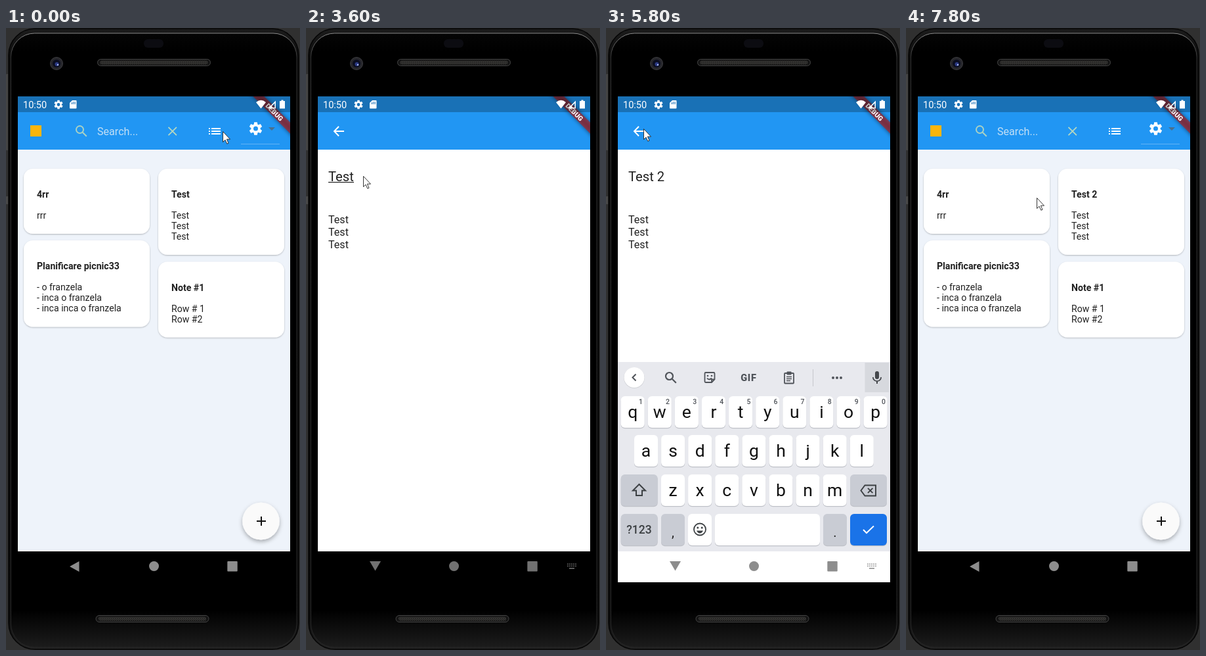
An HTML page that plays this animation: 448x946 px, repeating every 8000 ms.

```html
<!DOCTYPE html>
<html lang="en">
<head>
<meta charset="utf-8">
<title>Notes app</title>
<style>
  html, body { margin: 0; width: 100%; height: 100%; overflow: hidden; background: #303030; }
  svg { display: block; width: 100vw; height: 100vh; }
  text { font-family: Roboto, sans-serif; white-space: pre; }
</style>
</head>
<body>
<svg id="stage" viewBox="0 0 448 946"></svg>
<script>
const LOOP = 8000, STEP = 200;
const stage = document.getElementById('stage');

// ---- markup helpers ----
const rect = (x, y, w, h, fill, r = 0, extra = '') =>
  `<rect x="${x}" y="${y}" width="${w}" height="${h}" rx="${r}" fill="${fill}" ${extra}/>`;
const circle = (x, y, r, fill, extra = '') =>
  `<circle cx="${x}" cy="${y}" r="${r}" fill="${fill}" ${extra}/>`;
const text = (x, y, size, str, fill = '#212121', extra = '') =>
  `<text x="${x}" y="${y}" font-size="${size}" fill="${fill}" ${extra}>${str}</text>`;
const path = (d, fill, extra = '') => `<path d="${d}" fill="${fill}" ${extra}/>`;
const line = (d, color, width, extra = '') =>
  path(d, 'none', `stroke="${color}" stroke-width="${width}" ${extra}`);
const group = (id, content, extra = '') => `<g id="${id}" ${extra}>${content}</g>`;
// Icons are drawn around their own centre.
const at = (x, y, content, scale = 1) =>
  `<g transform="translate(${x} ${y}) scale(${scale})">${content}</g>`;
const centered = 'text-anchor="middle"';

// ---- icons ----
const gear = color => circle(0, 0, 5.3, 'none', `stroke="${color}" stroke-width="3.6"`) +
  [0, 60, 120, 180, 240, 300].map(a =>
    path('M-2.3 -9.8H2.3L2.9 -6H-2.9Z', color, `transform="rotate(${a})"`)).join('');
const magnifier = (color, width) =>
  circle(-2.5, -2.5, 5.5, 'none', `stroke="${color}" stroke-width="${width}"`) +
  line('M1.8 1.8L7.8 7.8', color, width);
const bullets = [-4, 0, 4].map(y =>
  rect(-9, y - 1, 2, 2, '#fff') + rect(-5, y - 1, 14, 2, '#fff')).join('');
const mic = path('M0 2a3 3 0 0 0 3-3V-7a3 3 0 0 0-6 0V-1a3 3 0 0 0 3 3zM5.3 -1a5.3 5.3 0 0 1-10.6 0H-7a7 7 0 0 0 6 6.7V9H1V5.7A7 7 0 0 0 7 -1z', '#44474b');
const chevron = dir => line(`M${-2.5 * dir} -5L${2.5 * dir} 0L${-2.5 * dir} 5`, '#50545a', 2);

// ---- phone ----
const speaker = (x, y) => rect(x, y, 172, 10, '#141414', 5, 'stroke="#454545"') +
  rect(x + 4, y + 2, 164, 6, 'url(#mesh)', 3);

const phone = rect(0, 0, 448, 946, '#303030') +
  rect(0, 70, 5, 116, '#444', 1) + rect(0, 256, 5, 12, '#484848', 1) +
  rect(4, 1, 442, 944, 'url(#frame)', 40, 'stroke="#050505" stroke-width="1.5"') +
  rect(7.5, 8, 435.5, 934, 'url(#face)', 36, 'stroke="url(#rim)"') +
  rect(210, 17, 30, 13, '#0c0c11', 6) +
  circle(77, 54, 9.5, '#26262b', 'stroke="#3c3c40"') + circle(77, 54, 6, '#0b0e20') +
  circle(77.5, 55, 3, '#2b3a86') + circle(79, 56, 1.2, '#b6c6f4') +
  speaker(139.5, 47.5) + speaker(137, 893.5) + rect(18, 104, 415, 739, '#000');

// ---- home page ----
const card = (x, y, h, title, rows, id = '') => {
  const left = x + 20;
  return rect(x, y, 192, h, '#fff', 14, 'filter="url(#cardShadow)"') +
    text(left, y + 44, 14.1, title, '#212121', `font-weight="700" ${id && `id="${id}"`}`) +
    rows.map((row, i) => text(left, y + 76 + i * 16.2, 14.1, row)).join('');
};

const home = rect(18, 104, 415, 691, '#eef3fa') + rect(18, 104, 415, 81, '#2196f3') +
  rect(37, 148, 17, 17, '#fbb50c') +
  at(115, 157, magnifier('#a9d2c4', 2)) +
  text(139, 163, 16.1, 'Search...', '#c2dff5') +
  at(253.7, 157, line('M-6.2 -6.2L6.2 6.2M6.2 -6.2L-6.2 6.2', '#b6d8c0', 1.8)) +
  at(318, 157, bullets) + at(380.5, 153, gear('#fff')) +
  path('M400 151H410L405 156Z', '#4b6f8c') + rect(358, 176, 59, 1, '#62b3f5') +
  card(27, 214, 99, '4rr', ['rrr']) +
  card(232, 214, 131, 'Test', ['Test', 'Test', 'Test'], 'cardTitle') +
  card(27, 323, 131.5, 'Planificare picnic33', ['- o franzela', '- inca o franzela', '- inca inca o franzela']) +
  card(232, 355.5, 115, 'Note #1', ['Row # 1', 'Row #2']) +
  circle(388.5, 750, 28.3, '#fafafa', 'filter="url(#buttonShadow)"') +
  line('M382 750H396M389 743V757', '#111', 2);

// ---- editor page ----
const editor = rect(18, 104, 415, 691, '#fff') + rect(18, 104, 415, 81, '#2196f3') +
  at(50, 157, line('M8 0H-6.5M0 -7.3L-7 0L0 7.3', '#fff', 2)) +
  text(34, 233, 20.2, 'Test', '#212121', 'id="noteTitle"') +
  rect(34, 234, 39, 1.2, '#212121', 0, 'id="underline"') +
  [297, 316, 335].map(y => text(34, y, 16.1, 'Test')).join('');

// ---- status bar ----
const banner = `<g transform="translate(433 104) rotate(45)">` +
  rect(-50, 28, 100, 12, '#000', 0, 'fill-opacity=".5" filter="url(#soft)"') +
  rect(-50, 28, 100, 12, '#b71c1c', 0, 'fill-opacity=".63"') +
  text(0, 37.7, 10.3, 'DEBUG', '#fff', `${centered} font-weight="900"`) + '</g>';

const status = text(26, 122, 14.5, '10:50', '#fff') + at(80, 116.5, gear('#fff'), .68) +
  path('M101 110H106.5Q107.5 110 107.5 111V121.5Q107.5 122.5 106.5 122.5H98Q97 122.5 97 121.5V114Z', '#fff') +
  line('M100.5 113V116M102.8 112V116M105.1 112V116', '#1a70b6', 1) +
  path('M388.5 122.5L381 113Q388.5 106.5 396 113Z', '#fff') +
  path('M399 122.5L411 110.5V122.5ZM405 121H409.5V114.2L405 118.7Z', '#fff', 'fill-rule="evenodd"') +
  path('M419.5 109.5H422.5V111H425V122.5H417V111H419.5Z', '#fff');

// ---- keyboard ----
const PITCH = 41.1, KEY_W = 36, KEY_H = 48, DARK_KEY = '#c9ccd4';
const key = (x, y, w = KEY_W, fill = '#fff') =>
  rect(x, y + 1.2, w, KEY_H, '#bfc1c8', 6) + rect(x, y, w, KEY_H, fill, 6);
const letters = (x0, y, row, hints = '') => [...row].map((ch, i) => {
  const x = x0 + i * PITCH;
  return key(x, y) + text(x + 18, y + 32.5, 26.5, ch, '#111', centered) +
    (hints ? text(x + 30.3, y + 12, 10.5, hints[i], '#50545a', `${centered} font-weight="500"`) : '');
}).join('');
const divider = x => rect(x, 519, 1, 26, '#c6c8cd');

const words = at(43, 531.5, chevron(1)) + divider(163) + divider(285) +
  [['for', 109.5], ['of', 224], ['results', 339]]
    .map(([word, x]) => text(x, 538.5, 18, word, '#50545a', centered)).join('');

const tools = at(43, 531.5, chevron(-1)) + at(99, 532, magnifier('#50545a', 2.2)) +
  at(158, 531.5, line('M-6 -7.5H6Q7.5 -7.5 7.5 -6V3L3 7.5H-6Q-7.5 7.5 -7.5 6V-6Q-7.5 -7.5 -6 -7.5ZM3 7V3H7M-4 1Q-1 5 3 1', '#50545a', 1.8) +
    circle(-3, -2.5, 1.3, '#50545a') + circle(3, -2.5, 1.3, '#50545a')) +
  text(217.5, 537, 14.5, 'GIF', '#50545a', `${centered} font-weight="900" letter-spacing=".8"`) +
  at(279, 532, rect(-7, -7, 14, 15.5, 'none', 1, 'stroke="#50545a" stroke-width="1.8"') +
    rect(-3.5, -9.5, 7, 5, '#50545a', 1) + line('M-4 -1.5H4M-4 1.5H4M-4 4.5H2', '#50545a', 1.5)) +
  divider(315) + [346, 352, 358].map(x => circle(x, 532, 2, '#50545a')).join('');

const keyboard = rect(18, 508, 415, 288, '#e8e9ee') + rect(18, 796, 415, 100, '#fff') +
  rect(394.5, 509, 36.5, 45, '#d7d9de') + at(413, 532, mic) +
  circle(43, 532, 15.8, '#c9cbd0') + circle(43, 531.5, 15.5, '#fff') +
  group('words', words) + group('tools', tools) +
  letters(22.7, 560, 'qwertyuiop', '1234567890') +
  letters(43, 619, 'asdfghjkl') + letters(84, 679, 'zxcvbnm') +
  key(22.7, 679, 56, DARK_KEY) +
  at(50.5, 703, line('M0 -9L-9.5 .5H-4.5V8H4.5V.5H9.5Z', '#3c4043', 2)) +
  key(372, 679, 56, DARK_KEY) +
  at(400, 703.5, line('M-5.5 -8H11V8H-5.5L-11.5 0ZM-1 -3.7L6.4 3.7M6.4 -3.7L-1 3.7', '#3c4043', 1.9)) +
  key(22.7, 739, 56, DARK_KEY) + text(50.5, 769, 17.5, '?123', '#3c4043', `${centered} font-weight="500"`) +
  key(84, 739, KEY_W, DARK_KEY) + text(102, 774, 20, ',', '#222', centered) +
  key(125, 739) +
  at(143, 762.5, circle(0, 0, 9, 'none', 'stroke="#3c4043" stroke-width="1.8"') +
    circle(-3.2, -2.5, 1.5, '#3c4043') + circle(3.2, -2.5, 1.5, '#3c4043') +
    path('M-5 2H5Q3 6 0 6T-5 2Z', '#3c4043')) +
  key(166, 739, 160) +
  key(331, 739, KEY_W, DARK_KEY) + text(349, 774, 20, '.', '#222', centered) +
  key(372, 739, 56, '#1a73e8') +
  at(400, 763, line('M-8 0L-3 5L8 -5.5', '#fff', 2));

// ---- navigation bar ----
const dots = [-6, -3, 0, 3, 6].map(x =>
  rect(x - .8, -4, 1.6, 1.6, 'currentColor') + rect(x - .8, -1, 1.6, 1.6, 'currentColor')).join('') +
  rect(-4, 2.5, 8, 1.6, 'currentColor');
const nav = path('M97 819L111.5 811V827Z', 'currentColor', 'id="backIcon"') +
  group('hideIcons', path('M97 811H114L105.5 825.5Z', 'currentColor') + at(405, 818.5, dots)) +
  circle(225.5, 818.5, 7.5, 'currentColor') + rect(337.3, 811, 15.4, 15.4, 'currentColor', 1);

const pointer = path('M.5 .5V16.5L4 13.2L6.8 19.2L9 18.2L6.4 12.2H11.5Z', '#fff',
  'id="pointer" stroke="#222" stroke-width=".9"');

const shadow = (id, dy, blur, opacity) =>
  `<filter id="${id}" x="-50%" y="-50%" width="200%" height="200%">
    <feDropShadow dx="0" dy="${dy}" stdDeviation="${blur}" flood-opacity="${opacity}"/></filter>`;
const gradient = (id, ...stops) => `<linearGradient id="${id}" x2="0" y2="1">` +
  stops.map(([offset, color]) => `<stop offset="${offset}" stop-color="${color}"/>`).join('') +
  '</linearGradient>';

stage.innerHTML = `<defs>
  ${gradient('frame', [0, '#1c1c1c'], [.05, '#0c0c0c'], [.95, '#0c0c0c'], [1, '#222'])}
  ${gradient('face', [0, '#050505'], [.03, '#000'], [.94, '#000'], [1, '#1c1c1c'])}
  ${gradient('rim', [0, '#8a8a8a'], [.04, '#303030'], [1, '#262626'])}
  <pattern id="mesh" width="3" height="3" patternUnits="userSpaceOnUse">
    <rect width="3" height="3" fill="#1c1c1b"/><rect width="1.3" height="1.5" fill="#4c4b48"/>
    <rect x="1.5" y="1.5" width="1.3" height="1.5" fill="#403f3c"/>
  </pattern>
  <filter id="soft" x="-20%" y="-200%" width="140%" height="500%"><feGaussianBlur stdDeviation="3"/></filter>
  <clipPath id="appArea"><rect x="18" y="104" width="415" height="691"/></clipPath>
  <clipPath id="screenArea"><rect x="18" y="104" width="415" height="739"/></clipPath>
  ${shadow('cardShadow', 1, 1, .26)}${shadow('buttonShadow', 3, 3, .3)}
  </defs>` + phone +
  `<g clip-path="url(#appArea)">${home}${group('editor', editor)}${banner}</g>` +
  rect(18, 104, 415, 24, '#000', 0, 'fill-opacity=".25"') + status +
  rect(18, 795, 415, 1, '#fff') +
  `<g clip-path="url(#screenArea)">${group('keyboard', keyboard)}</g>` +
  group('nav', nav) + pointer;

// ---- motion ----
const el = Object.fromEntries([...stage.querySelectorAll('[id]')].map(e => [e.id, e]));
const show = (node, visible) => node.setAttribute('visibility', visible ? 'visible' : 'hidden');
const shift = (node, x, y) => node.setAttribute('transform', `translate(${x} ${y})`);

// Keyframes: [time, ...values], linear in between.
function tween(keys, t) {
  const i = keys.findIndex(k => k[0] > t);
  if (i < 0) return keys.at(-1).slice(1);
  if (i === 0) return keys[0].slice(1);
  const a = keys[i - 1], b = keys[i], p = (t - a[0]) / (b[0] - a[0]);
  return a.slice(1).map((v, n) => v + (b[n + 1] - v) * p);
}

const pointerPath = [
  [0, 330, 157], [200, 376, 147], [400, 408, 300], [600, 420, 560], [800, 400, 814],
  [1000, 350, 640], [1200, 270, 400], [1400, 279, 299], [2000, 279, 299], [2400, 88, 226],
  [3600, 87, 225], [4000, 86, 226], [5200, 86, 226], [5800, 57, 153], [6200, 57, 153],
  [6400, 48, 190], [6600, 190, 390], [6800, 322, 531], [7000, 430, 380],
  [7200, 436, 130], [7400, 376, 152], [7600, 72, 266], [7800, 199, 258]];
const editorFade = [[1600, 0], [2000, 1], [5800, 1], [6200, 0]];
const keyboardRise = [[3600, 0], [4000, 1], [5800, 1], [6200, 0]];

function render(t) {
  const [open] = tween(editorFade, t), [rise] = tween(keyboardRise, t);
  const typing = t >= 3400 && t < 6200;
  shift(el.pointer, ...tween(pointerPath, t));
  el.editor.setAttribute('opacity', open);
  shift(el.editor, 0, 170 * (1 - open) ** 2);
  show(el.keyboard, rise > 0);
  shift(el.keyboard, 0, 335 * (1 - rise));

  const edited = t >= 4800;
  el.words.style.display = edited ? 'none' : '';
  el.tools.style.display = edited ? '' : 'none';
  el.noteTitle.textContent = el.cardTitle.textContent = edited ? 'Test 2' : 'Test';
  show(el.underline, t >= 3400 && t < 4200);

  show(el.hideIcons, typing);
  show(el.backIcon, !typing);
  el.nav.style.color = typing && rise === 0 ? '#717171' : '#8d8d8d';
}

// The screen refreshes five times a second.
function frame() {
  const t = performance.now() % LOOP;
  render(Math.floor(t / STEP) * STEP);
  requestAnimationFrame(frame);
}
frame();
</script>
</body>
</html>
```
